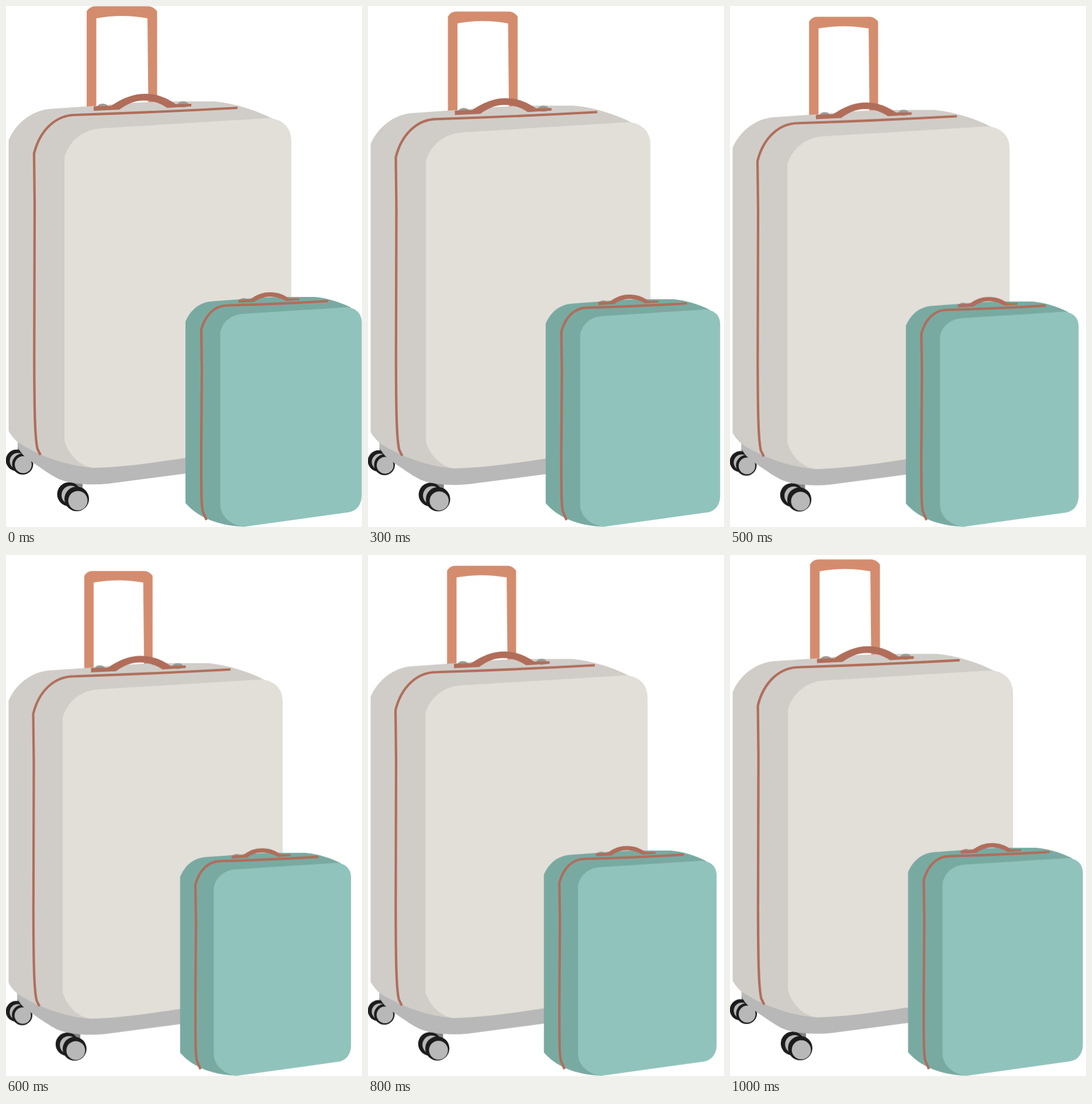
Write an HTML page without scripts that moves like this. It is 609x890 px and loops after 1100 ms.

```html
<!DOCTYPE html>
<html lang="en">
<head>
<meta charset="utf-8">
<title>Two suitcases</title>
<style>
  html, body { margin: 0; width: 100%; height: 100%; overflow: hidden; background: #fff; }
  svg { display: block; width: 100vw; height: 100vh; }
  .set { transform-origin: 0 890px; animation: pulse 1.1s step-end infinite; }
  .trolley { fill: #d48c6e; }
  .strap { fill: #b06d5a; }
  .seam { fill: none; stroke: #b06d5a; stroke-width: 4.2; }
  .bump { fill: #989c92; }
  .post { fill: #858585; }
  .tyre { fill: #1c1c1d; }
  .metal { fill: #b8b8b8; }
  .sand-side { fill: #d0cdc8; }
  .sand { fill: #e2dfd8; }
  .teal-side { fill: #79aaa2; }
  .teal { fill: #90c3bc; }

  /* shrink to 97% in steps, then grow back */
  @keyframes pulse {
    0% { transform: scale(1); }
    18.18% { transform: scale(.995); }
    27.27% { transform: scale(.99); }
    36.36% { transform: scale(.985); }
    45.45% { transform: scale(.98); }
    54.54% { transform: scale(.97); }
    63.63% { transform: scale(.975); }
    72.72% { transform: scale(.98); }
    81.81% { transform: scale(.986); }
    90.9% { transform: scale(.992); }
  }
</style>
</head>
<body>
<svg viewBox="0 0 609 890">
  <g class="set">
    <g id="large">
      <path class="trolley" d="M138 172V9Q143 .5 153 .5H243Q252 .5 258.500 9V168H243.500L242 21Q198 13 154.500 21V172Z"/>

      <g id="wheels">
        <path class="post" d="M20 742H36V772H20ZM111 808H131V826H111Z"/>
        <circle class="tyre" cx="18" cy="776" r="18.300"/>
        <circle class="metal" cx="20.500" cy="777.500" r="14"/>
        <circle class="tyre" cx="28.500" cy="782.500" r="18"/>
        <circle class="metal" cx="29.500" cy="783.500" r="14.500"/>
        <circle class="tyre" cx="108" cy="834" r="20.500"/>
        <circle class="metal" cx="111" cy="835.500" r="16"/>
        <circle class="tyre" cx="121" cy="842" r="21"/>
        <circle class="metal" cx="123" cy="845" r="16.500"/>
      </g>

      <path class="metal" d="M20 743L20 752Q24 766 46 780C60 789 74 800 90 808C112 817 145 819 175 816L320 797V765L150 780Z"/>
      <path class="sand-side" d="M4.500 229C17 200 45 177 79 175.500L160 170C210 165 250 163 300 163H357C395 167 430 179 457 193L450 400L150 789C100 786 50 765 20 745Q10 736 4.500 726Z"/>
      <path class="sand" d="M100 258C108 232 130 211 163 209L450 191.500C470 193 488 205 488 230V715C488 735 475 748 450 752L307 772C260 779 200 788 150 789C122 786 104 760 100 742Z"/>
      <path class="seam" d="M59 767L54 757C49 738 48.500 680 48.300 600L49 340L48 252C58 212 85 186 120 186Q260 181.500 396 174"/>
      <ellipse class="bump" cx="165.500" cy="172" rx="9" ry="5.200"/>
      <ellipse class="bump" cx="303" cy="168" rx="9" ry="5.200"/>
      <path class="strap" d="M150 171.500L180 170.500C200 157 218 150 238 150C258 150 275 157 290 167.500L317 167V171.500L276 174C262 165 250 161.500 236 161.500C220 161.500 208 167 194 177L150 179Z"/>
    </g>

    <g id="small">
      <path class="teal-side" d="M307 539C316 518 332 506 352 504.500L400 501Q440 497 480 497H528C550 499 572 506 590 515L560 600L408 889.500C360 888 327 872 307 849Z"/>
      <path class="teal" d="M366.500 558C370 540 385 527 405 526L585 514.500C600 517 608.500 526 608.500 540V835C608.500 852 600 863 585 865L408 889.500C385 887 367 872 366.500 852Z"/>
      <path class="seam" d="M343 878L336.500 863C334 850 334 830 334 760L335 620L334 553C341 527 357 512 378 511.500Q470 509 551 504"/>
      <ellipse class="bump" cx="407" cy="502.500" rx="7" ry="3.500"/>
      <path class="strap" d="M398 501.500L418 501C430 492 440 489 452 489C465 489 475 493 484 499.500L502 499.500V502.500L479 504C470 499 462 496.500 451 496.500C441 496.500 433 500 425 505.500L398 507Z"/>
    </g>
  </g>
</svg>
</body>
</html>
```
